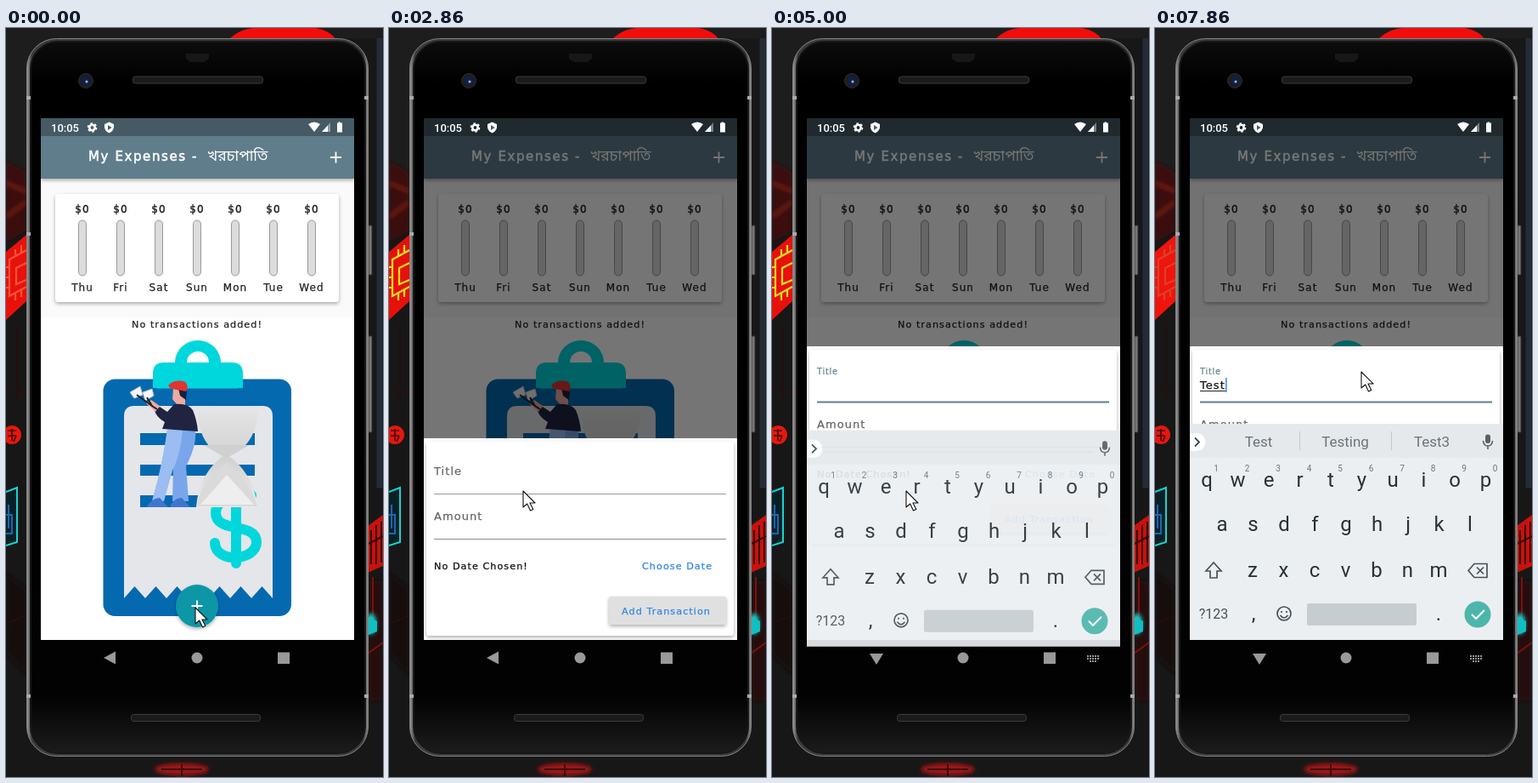
An HTML page for the animation above (8 s loop, 444x880 px).

```html
<!DOCTYPE html>
<html lang="en">
<head>
<meta charset="utf-8">
<title>Expense tracker demo</title>
<style>
  html, body { margin: 0; width: 100%; height: 100%; overflow: hidden; background: #151515; }
  svg { display: block; width: 100vw; height: 100vh; }
  text { white-space: pre; }
  .ui { font-family: "DejaVu Sans", sans-serif; letter-spacing: 1.050px; stroke-width: .25px; }
  .head { letter-spacing: 1.600px; stroke-width: .55px; }
  .bn { font-family: "Noto Sans Bengali", "Noto Sans", sans-serif; font-size: 17.500px; letter-spacing: 0; stroke: none; }
  .kb { font-family: Roboto, sans-serif; }
  .mid { text-anchor: middle; }
</style>
</head>
<body>
<svg viewBox="0 0 444 880" preserveAspectRatio="none">
  <defs>
    <clipPath id="screen"><path d="M41 106H410V719H41Z"/></clipPath>
    <clipPath id="keyArea"><path d="M41 106H410V727H41Z"/></clipPath>
    <linearGradient id="body" y2="1" x2="0">
      <stop stop-color="#0c0c0c"/><stop offset=".06" stop-color="#000"/>
      <stop offset=".92" stop-color="#020202"/><stop offset="1" stop-color="#1c1c1c"/>
    </linearGradient>
    <linearGradient id="rim">
      <stop stop-color="#9a9a9a"/><stop offset=".015" stop-color="#3c3c3c"/>
      <stop offset=".985" stop-color="#3c3c3c"/><stop offset="1" stop-color="#8a8a8a"/>
    </linearGradient>
    <linearGradient id="glass" y2="1" x2="0">
      <stop stop-color="#e3e3e4"/><stop offset=".5" stop-color="#d2d2d3"/><stop offset="1" stop-color="#ececec"/>
    </linearGradient>
    <filter id="soft" x="-20%" y="-20%" width="140%" height="150%">
      <feDropShadow dx="0" dy="2" stdDeviation="2" flood-opacity=".32"/>
    </filter>
    <filter id="blur" x="-50%" y="-50%" width="200%" height="200%"><feGaussianBlur stdDeviation="2.500"/></filter>
  </defs>

  <g id="wall">
    <rect width="444" height="880" fill="#171717"/>
    <path d="M0 0H444V12H60L24 50V200L0 190Z" fill="#1d1d1d"/>
    <path d="M262 14Q276 0 294 0H365Q382 3 389 14Z" fill="#f20d0d"/>
    <g filter="url(#blur)">
      <path d="M0 156L24 170V238L0 252Z" fill="#3a0e09"/>
      <path d="M0 182L24 192M0 222L24 204" stroke="#7a2213" stroke-width="3"/>
      <path d="M0 640L24 660V760L0 735Z" fill="#190a0a"/>
      <path d="M427 650H444V790H427Z" fill="#260909"/>
      <ellipse cx="207" cy="871" rx="32" ry="7" fill="#a31212"/>
    </g>
    <path id="sign" d="M0 263L24 243V321L0 343Z"/>
    <path id="chip" d="M24 261L4 272V315L24 304M4 281H0M4 293H0M4 305H0M11 268V260M18 264V255M11 311V320M18 307V316M24 276L12 282V301L24 296" fill="none" stroke-width="2.200"/>
    <path d="M0 420L24 428M13 350V440M0 700L24 690" stroke="#2b0d0c" stroke-width="1.500"/>
    <circle cx="7" cy="478" r="11" fill="#e3180e"/>
    <path d="M2 473H12M2 479H12M7 471V485M12 479L9 486" stroke="#4a0906" stroke-width="1.700" fill="none"/>
    <path d="M0 545L13 540V604L0 608" stroke="#17d4d0" stroke-width="2" fill="#0a2027"/>
    <path d="M0 572H7V594H0M3 560V588" stroke="#1769b5" stroke-width="2" fill="none"/>
    <path d="M426 585L444 572V632L426 640Z" fill="#c8120d"/>
    <path d="M430 590V630M436 584V630M442 580V628M427 606L444 597" stroke="#360907" stroke-width="2"/>
    <path d="M432 645V690M426 735L444 722" stroke="#7a120e" stroke-width="2"/>
    <ellipse cx="430" cy="700" rx="6" ry="12" fill="#14d8d4" filter="url(#blur)"/>
    <path d="M427 692L437 697V709L427 713Z" fill="#10bfc2"/>
    <path d="M436 11H444V541H436Z" fill="#252c35" stroke="#11161c"/>
    <path d="M183 871H231M207 865V879" stroke="#3b0808" stroke-width="2"/>
  </g>

  <g id="phone">
    <path d="M427 232H431V290H427ZM427 362H431V475H427Z" fill="#777" stroke="#333"/>
    <rect x="24.500" y="12.500" width="402" height="843" rx="35" fill="url(#rim)" stroke="#858585"/>
    <rect x="29" y="16" width="394" height="836" rx="32" fill="url(#body)" stroke="#171717" stroke-width="2"/>
    <path d="M24 82H29M24 242H29M422 82H427M24 785H29M422 785H427" stroke="#aaa" stroke-width="4"/>
    <path d="M212 30H239V36L234 40H217L212 36Z" fill="#171717"/>
    <circle cx="94" cy="62" r="8.500" fill="#1b1d24" stroke="#2b2c32"/>
    <circle cx="94" cy="62" r="4.500" fill="#10204b"/><circle cx="95" cy="63" r="1.500" fill="#9fb6e6"/>
    <rect x="149.500" y="57" width="153" height="8" rx="3" fill="#1b1b1b" stroke="#3c3c3c"/>
    <rect x="147.500" y="806.500" width="152" height="8" rx="3" fill="#1b1b1b" stroke="#3c3c3c"/>
  </g>

  <g clip-path="url(#screen)">
    <path d="M41 106H410V719H41Z" fill="#fff"/>
    <path d="M41 177H410V340H41Z" fill="#fafafa"/>
    <path d="M41 127H410V177H41Z" fill="#607d8b" filter="url(#soft)"/>
    <path d="M41 106H410V127H41Z" fill="#455a64"/>
    <text class="ui head" x="97" y="156" font-size="15" fill="#fff" stroke="#fff">My Expenses - <tspan class="bn" x="237">খরচাপাতি</tspan></text>
    <path d="M382 152H395M388.500 145.500V158.500" stroke="#fff" stroke-width="1.800"/>
    <rect x="58" y="195" width="334" height="127" rx="4" fill="#fff" filter="url(#soft)"/>
    <g id="week" class="ui mid" font-size="12" fill="#222" stroke="#222"></g>
    <text class="ui mid" x="225" y="351.500" font-size="11.200" fill="#222" stroke="#222">No transactions added!</text>

    <g id="clipboard">
      <rect x="114.500" y="412.500" width="221.500" height="278.500" rx="14" fill="#0569b0"/>
      <path id="paper" fill="#e4e6ea"/>
      <path d="M158 476H293V490H158ZM158 513H293V526H158ZM158 549H293V563H158Z" fill="#0569b0"/>
      <path d="M199 393A27 26 0 0 1 253 393H266Q279 393 279 406V423H173V406Q173 393 186 393Z" fill="#00d7dc"/>
      <rect x="173" y="406" width="106" height="17.500" rx="6" fill="#00d7dc"/>
      <path d="M213 393A13 13 0 0 1 239 393Z" fill="#fff"/>
      <path d="M289 549C279 547 247 550 247 570C247 594 295 580 295 604C295 626 247 630 246 605M271 545V629" fill="none" stroke="#00d7dc" stroke-width="12" stroke-linecap="round"/>
      <path d="M226 450H296V458Q291 492 263 503Q292 525 296 563H224Q227 525 255 503Q230 491 226 458Z" fill="url(#glass)"/>
      <path d="M232 490H287L260 505Z" fill="#d0d0d1"/>
      <path d="M225 562Q228 535 260 510Q289 535 296 562Z" fill="#dadada"/>
      <path d="M229 560L260 525L292 560Z" fill="#eee"/>
    </g>
    <g id="person">
      <path d="M190 472H223Q225 490 212 515Q214 540 215 556H196L197 512L185 556H172Q184 516 190 472Z" fill="#79a6eb"/>
      <path d="M190 472H208Q206 500 196 520L186 556H172Q184 516 190 472Z" fill="#9bbdf2"/>
      <path d="M166 563Q170 553 181 552L191 563ZM193 563Q196 553 207 552L217 563Z" fill="#3e75d1"/>
      <path d="M197 424L211 427L211 443H202L196 436Z" fill="#eeaaa0"/>
      <path d="M203 423L213 426L212 437L205 432Z" fill="#17213e"/>
      <path d="M191 420Q197 413 210 415Q216 420 212 427L193 423Z" fill="#e3342e"/>
      <path d="M198 442Q214 440 220 449Q225 461 226 474L184 471L187 463Q178 458 175 450L181 445L190 451Z" fill="#202440"/>
      <path d="M165 441L171 437L181 444L176 451Z" fill="#eeaaa0"/>
      <path d="M146 428L158 421L161 431L151 435ZM161 428L172 424L174 432L164 438Z" fill="#f5f6f9" stroke="#b8bec8"/>
      <path d="M154 431L172 444M166 434L172 444L178 448" fill="none" stroke="#222" stroke-width="2"/>
    </g>
    <g filter="url(#soft)"><circle cx="225" cy="679" r="25" fill="#0d96a6"/></g>
    <path d="M218.500 679H231.500M225 672.500V685.500" stroke="#fff" stroke-width="1.800"/>
    <rect id="shade" x="41" y="106" width="369" height="613"/>

    <g fill="#fff">
      <text class="kb" x="53" y="121.500" font-size="13" font-weight="500">10:05</text>
      <circle cx="101.500" cy="117" r="3.200" fill="none" stroke="#fff" stroke-width="2.600"/>
      <circle cx="101.500" cy="117" r="5" fill="none" stroke="#fff" stroke-width="1.600" stroke-dasharray="2.600 2.600"/>
      <path d="M121.500 110.500L127 113V117Q126 121.500 121.500 123.500Q117 121.500 116 117V113Z"/>
      <path d="M120 114L124.500 117L120 120Z" fill="#455a64"/>
      <path d="M356 113Q363 108 370 113L363 122ZM390 111.500H391.500V110.500H394V111.500H396V122.500H390Z"/>
      <path d="M382 111V122H372Z" opacity=".4"/><path d="M379 114.500V122H372Z"/>
    </g>

    <g id="sheet">
      <path d="M41 482H410V830H41Z" fill="#fff"/>
      <rect x="44" y="486" width="362" height="228" rx="4" fill="#fff" filter="url(#soft)"/>
      <g class="ui" font-size="11.200" fill="#111" stroke="#111">
        <g id="label"><text font-size="13">Title</text></g>
        <text x="53" y="577.500" font-size="13" fill="#666" stroke="#666">Amount</text>
        <text x="53" y="635.500">No Date Chosen!</text>
        <text x="298" y="635.500" fill="#2f86e5" stroke="#2f86e5">Choose Date</text>
        <rect x="259" y="668" width="138" height="33" rx="2" fill="#e0e0e0" stroke="none" filter="url(#soft)"/>
        <text x="274" y="689" fill="#2f86e5" stroke="#2f86e5">Add Transaction</text>
        <text id="typed" x="53" y="532" font-size="13"></text>
      </g>
      <path id="typedLine" stroke="#222"/>
      <path id="caret" stroke="#4285f4" stroke-width="1.600"/>
      <path id="rule" d="M53 547.500H397"/>
      <path d="M53 600.500H397" stroke="#8b8b8b"/>
    </g>
  </g>

  <g clip-path="url(#keyArea)">
    <g id="keyboard" class="kb">
      <path d="M41 465H410V719H41Z" fill="#eceff1"/>
      <path d="M41 465H410V505H41Z" fill="#e5e9eb"/>
      <g id="hints" class="mid" font-size="17" fill="#69747a"></g>
      <path d="M41 476H49A9.500 9.500 0 0 1 49 497H41Z" fill="#fff"/>
      <path d="M47 481.500L52 486.500L47 491.500" fill="none" stroke="#37474f" stroke-width="1.800"/>
      <rect x="389" y="477.500" width="6" height="10.500" rx="3" fill="#566268"/>
      <path d="M386.500 485Q387 491 392 491Q397 491 397.500 485M392 491V495" fill="none" stroke="#566268" stroke-width="1.600"/>
      <g id="keys" class="mid" fill="#263238" font-size="24"></g>
      <g fill="none" stroke="#46535a" stroke-width="1.700">
        <path d="M69 628L60 638H65V646H73V638H78Z"/>
        <path d="M369 637.500L376 629.500H391V645.500H376ZM379 633.500L387 641.500M387 633.500L379 641.500"/>
        <circle cx="152" cy="688" r="8"/>
        <path d="M147.500 690Q152 696 156.500 690M149 685V687M155 685V687"/>
      </g>
      <rect x="179" y="676" width="129" height="26" rx="2" fill="#c6cdd1"/>
      <circle cx="380" cy="689" r="15.500" fill="#4db6ac"/>
      <path d="M373 689L378 694L388 684" fill="none" stroke="#fff" stroke-width="2"/>
    </g>
  </g>

  <g id="nav" fill="#999">
    <path id="back"/><circle cx="225" cy="740" r="6.500"/><path d="M320 733.500H334V747H320Z"/>
    <path id="imeIcon" d="M371 738H386M371 741H386M374 744H383" stroke="#999" stroke-width="2" stroke-dasharray="2 1"/>
  </g>
  <path id="mouse" d="M0 0V19L4.700 15L8.500 23L11.800 21.500L8 14H14Z" fill="#fff" stroke="#111" stroke-width="1.100" stroke-linejoin="round"/>
</svg>

<script>
const LOOP = 8000, FPS = 7;
const $ = id => document.getElementById(id);
const set = (id, attrs) => { for (const k in attrs) $(id).setAttribute(k, attrs[k]); };
const span = (t, a, b) => Math.min(1, Math.max(0, (t - a) / (b - a)));
const smooth = p => p * p * (3 - 2 * p);
const out = p => 1 - (1 - p) ** 3;
const mix = (a, b, p) => a + (b - a) * p;
const move = (x, y) => `translate(${x} ${y})`;
const label = (x, y, s, extra = "") => `<text x="${x}" y="${y}" ${extra}>${s}</text>`;

function build() {
  $("week").innerHTML = ["Thu", "Fri", "Sat", "Sun", "Mon", "Tue", "Wed"].map((day, i) => {
    const x = 90 + 45 * i;
    return label(x, 217, "$0", 'stroke-width=".4"') + label(x, 309, day) +
      `<rect x="${x - 4.5}" y="226" width="9" height="65" rx="4.5" fill="#dcdcdc" stroke="#999" stroke-width="1"/>`;
  }).join("");

  let edge = "";
  for (let i = 0; i <= 14; i++) edge += `L${139 + 12.5 * i} ${i % 2 ? 656 : 670}`;
  set("paper", { d: `M314 670V456Q314 444 302 444H151Q139 444 139 456${edge}Z` });

  const row = (s, x, y) => [...s].map((c, i) => label(x + 36.5 * i, y, c)).join("");
  const digits = [..."1234567890"].map((c, i) =>
    label(72 + 36.5 * i, 521, c, 'font-size="10" fill="#6a757b"')).join("");
  $("keys").innerHTML = row("qwertyuiop", 61, 539) + digits + row("asdfghjkl", 79, 591) +
    row("zxcvbnm", 115, 645) + label(69, 694, "?123", 'font-size="16" fill="#46535a"') +
    label(116, 696, ",") + label(334, 696, ".");
}

function wallpaper(t) {
  const [sign, chip] =
    t < 1280 ? ["#e8120b", "#ff5238"] :
    t < 2000 ? ["#f5140a", "#f56c5a"] :
    t < 5500 ? ["#e5110a", "#ffdf18"] :
    t < 6700 ? ["#c5130d", "#23c8bd"] : ["#f0140c", "#d8412a"];
  set("sign", { fill: sign });
  set("chip", { stroke: chip });
}

function hints(words, shown) {
  $("hints").innerHTML = shown
    ? words.map((w, i) => label(122 + 102 * i, 492, w)).join("") +
      '<path d="M170.500 474V496M278.500 474V496" stroke="#c3c9cc"/>'
    : '<path d="M62 490.500H380" stroke="#d9dddf"/>';
}

function field(t) {
  const focus = smooth(span(t, 3560, 3800));
  const size = mix(1, 0.75, focus);
  set("label", {
    transform: `${move(53, mix(525, 515, focus))} scale(${size})`,
    fill: focus ? "#607d8b" : "#666", stroke: focus ? "#607d8b" : "#666"
  });
  set("rule", { stroke: focus ? "#607d8b" : "#999", "stroke-width": mix(1, 1.8, focus) });

  const count = Math.min(4, Math.max(0, Math.floor((t - 6850) / 190) + 1));
  const text = "Test".slice(0, count);
  $("typed").textContent = text;
  const w = count ? $("typed").getComputedTextLength() : 0;
  set("typedLine", { d: count ? `M53 534.500H${53 + w}` : "" });
  const blink = t % 1000 >= 200 && t % 1000 < 700;
  const caret = count || (t > 4100 && blink);
  set("caret", { d: caret ? `M${54 + w} 519V536` : "" });
  return count;
}

function render(now) {
  const t = Math.floor((now % LOOP + 5) * FPS / 1000) * 1000 / FPS;
  wallpaper(t);

  const open = out(span(t, 1180, 1540));
  const raised = t > 4850;
  set("shade", { opacity: 0.54 * open });
  set("sheet", { transform: move(0, raised ? -108 : 240 * (1 - open)) });

  const count = field(t);
  hints(count > 2 ? ["Test", "Testing", "Test3"] : ["thanks", "I", "we"], t > 5100);

  const rise = span(t, 4780, 5030);
  set("keyboard", {
    transform: move(0, 65 * (1 - rise)),
    opacity: raised ? Math.min(1, 0.3 + 0.7 * rise) : 0
  });
  set("back", { d: raised ? "M115 735H131L123 748Z" : "M129 732.500V747.500L115 740Z" });
  set("imeIcon", { opacity: raised ? 1 : 0 });

  const a = smooth(span(t, 1750, 2750)), b = smooth(span(t, 5950, 6800));
  set("mouse", { transform: move(mix(mix(223, 158, a), 243, b), mix(mix(681, 544, a), 404, b)) });
}

build();
const start = performance.now();
function loop() {
  render(performance.now() - start);
  requestAnimationFrame(loop);
}
loop();
</script>
</body>
</html>
```
